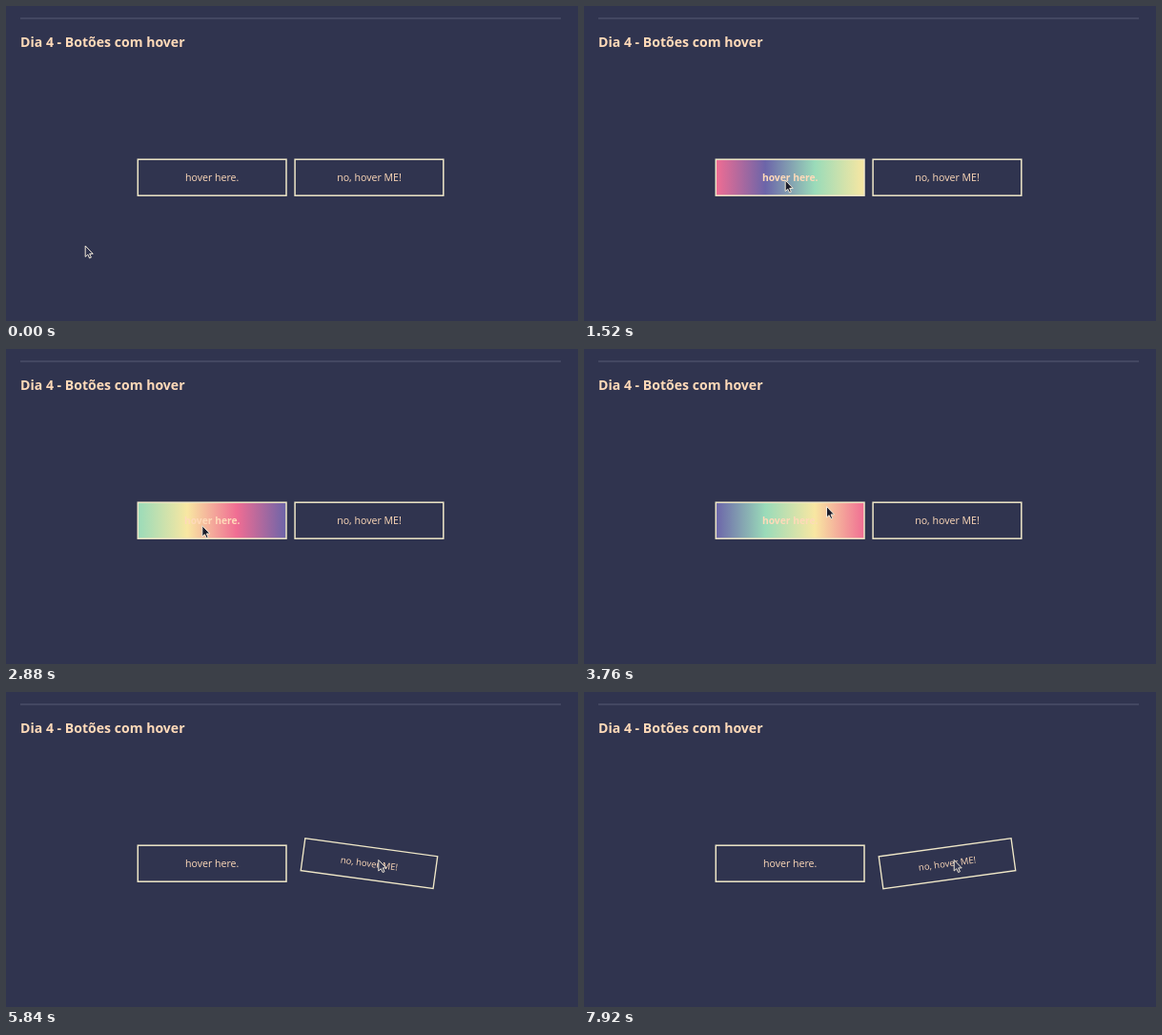
Write an HTML page that moves like this. It is 600x331 px and loops after 8 s.

```html
<!DOCTYPE html>
<html lang="pt">
<head>
<meta charset="utf-8">
<title>Botões com hover</title>
<style>
  html, body { margin: 0; width: 100%; height: 100%; overflow: hidden; background: #30344f; }
  svg { display: block; width: 100vw; height: 100vh; }
  text { font: 500 10.6px "Open Sans", "Noto Sans", sans-serif; fill: #ffdab9; }
  .title { font-size: 14.08px; font-weight: 700; }
  .label { text-anchor: middle; }
  .hot { font-size: 10.3px; font-weight: 700; }
  .box { fill: none; stroke: #f0e8c8; stroke-width: 1.5; }
  #cursor { stroke: #f0e8d8; stroke-linejoin: round; }
</style>
</head>
<body>
<svg viewBox="0 0 600 331">
  <defs>
    <linearGradient id="rainbow">
      <stop offset="0"/><stop offset=".3333"/><stop offset=".6667"/><stop offset="1"/>
    </linearGradient>
  </defs>
  <path d="M15 13H582" stroke="#565a74"/>
  <text class="title" x="15" y="42.6">Dia 4 - Botões com hover</text>

  <rect id="fill" x="138.3" y="161.2" width="155.7" height="38" fill="url(#rainbow)"/>
  <rect class="box" x="138.3" y="161.2" width="155.7" height="38"/>
  <text id="first" class="label" x="216.2" y="184">hover here.</text>

  <g id="second">
    <rect class="box" x="303.1" y="161.2" width="155.7" height="38"/>
    <text class="label" x="381" y="184">no, hover ME!</text>
  </g>

  <path id="cursor" d="M0 0V11.5L2.6 9.2L4.4 13L6.2 12.2L4.5 8.4H8Z"/>
</svg>
<script>
  const LOOP = 8000;
  const HOVER_ON = 400, HOVER_OFF = 4690, WIGGLE_ON = 4866;
  const HOP = 250, HOP_START = 275;
  const SWING = 594;
  const colors = ['#f06d93', '#6c65a9', '#9adbb9', '#f8e7a2'];

  // where the pointer comes to rest
  const stays = [
    { t: 0, x: 83.2, y: 252 },
    { t: 640, x: 211.5, y: 183 },
    { t: 1440, x: 211.5, y: 183 },
    { t: 2160, x: 202.5, y: 187 },
    { t: 2720, x: 202.5, y: 187 },
    { t: 3760, x: 254.5, y: 165.5 },
    { t: 4480, x: 263.3, y: 177.5 },
    { t: 5400, x: 391, y: 176.5 },
    { t: LOOP, x: 388.2, y: 176.5 }
  ];

  const $ = id => document.getElementById(id);
  const fill = $('fill'), first = $('first'), second = $('second'), cursor = $('cursor');
  const stops = document.querySelectorAll('stop');
  const mix = (a, b, k) => a + (b - a) * k;
  const ease = u => u * u * (3 - 2 * u);

  function pointerAt(t) {
    const i = stays.findIndex(s => s.t > t);
    const a = stays[i - 1], b = stays[i];
    const k = ease((t - a.t) / (b.t - a.t));
    return `translate(${mix(a.x, b.x, k)} ${mix(a.y, b.y, k)})`;
  }

  function wiggleAt(t) {
    if (t < WIGGLE_ON) return '';
    const angle = -10 * Math.sin(2 * Math.PI * (t - WIGGLE_ON) / SWING);
    return `translate(381 180.2) rotate(${angle}) scale(.9) translate(-381 -180.2)`;
  }

  function draw() {
    const t = performance.now() % LOOP;
    const hot = t >= HOVER_ON && t < HOVER_OFF;
    const hop = Math.floor((t - HOP_START + LOOP) / HOP);

    fill.style.display = hot ? '' : 'none';
    first.classList.toggle('hot', hot);
    stops.forEach((s, i) => s.setAttribute('stop-color', colors[(i + hop) % colors.length]));
    second.setAttribute('transform', wiggleAt(t));
    cursor.setAttribute('transform', pointerAt(t));
    cursor.setAttribute('fill', hot ? '#1c1d2b' : '#30344f');

    requestAnimationFrame(draw);
  }
  draw();
</script>
</body>
</html>
```
